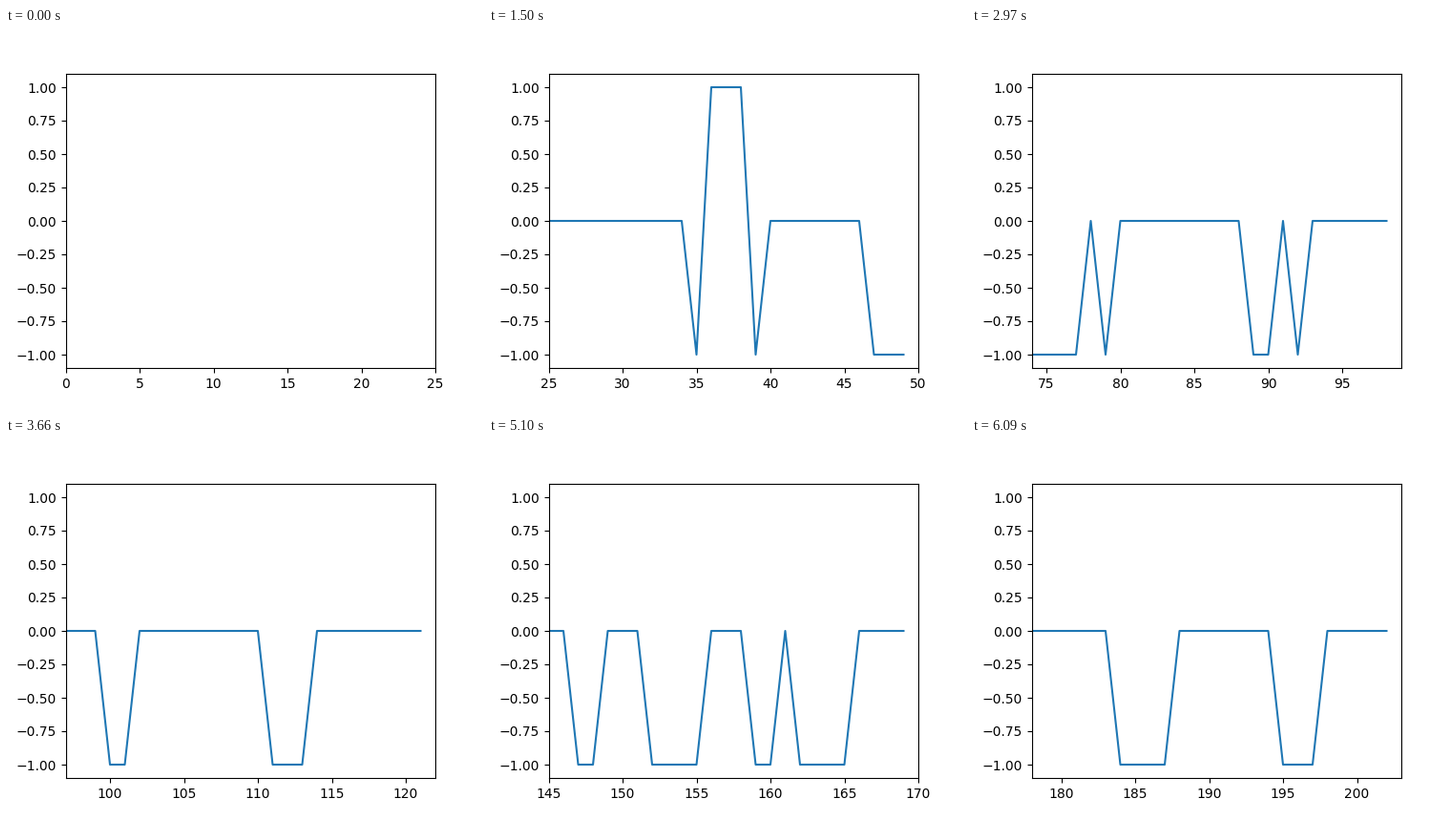
A matplotlib script that plays this animation: 500x400 px, repeating every 6.12 s.

```python
import numpy as np
import matplotlib.pyplot as plt
from matplotlib.animation import FuncAnimation

WINDOW = 25
FRAMES = 204
INTERVAL = 30

signal = np.zeros(FRAMES - 1)
steps = np.arange(len(signal))


def dip(starts, width):
    for s in starts:
        signal[s:s + width] = -1


def swell(start):
    """Width of a regular dip: widest around step 160."""
    return round(4 - ((start - 160) / 47) ** 2)


# Two tall spikes
for s in (10, 35):
    dip([s], 5)
    signal[s + 1:s + 4] = 1

# Long, uneven dips
for s, width in ((47, 7), (56, 3), (67, 11)):
    dip([s], width)

# Regular dips, paused while the faster pulses run
for s in (*range(89, 134, 11), *range(162, 196, 11)):
    dip([s], swell(s))

# Two overlapping trains of fast pulses, then single blips
dip(range(140, 155, 7), 2)
dip(range(152, 160, 7), 2)
dip((79, 92, 129), 1)

fig, ax = plt.subplots(figsize=(5, 4), dpi=100)
line, = ax.plot([], [])
ax.set_ylim(-1.1, 1.1)
ax.set_xlim(0, WINDOW)


def update(n):
    line.set_data(steps[:n], signal[:n])
    end = max(n, WINDOW)
    ax.set_xlim(end - WINDOW, end)
    return line,


anim = FuncAnimation(fig, update, frames=FRAMES, interval=INTERVAL,
                     init_func=lambda: update(0), repeat=True, repeat_delay=0)
plt.show()
```
